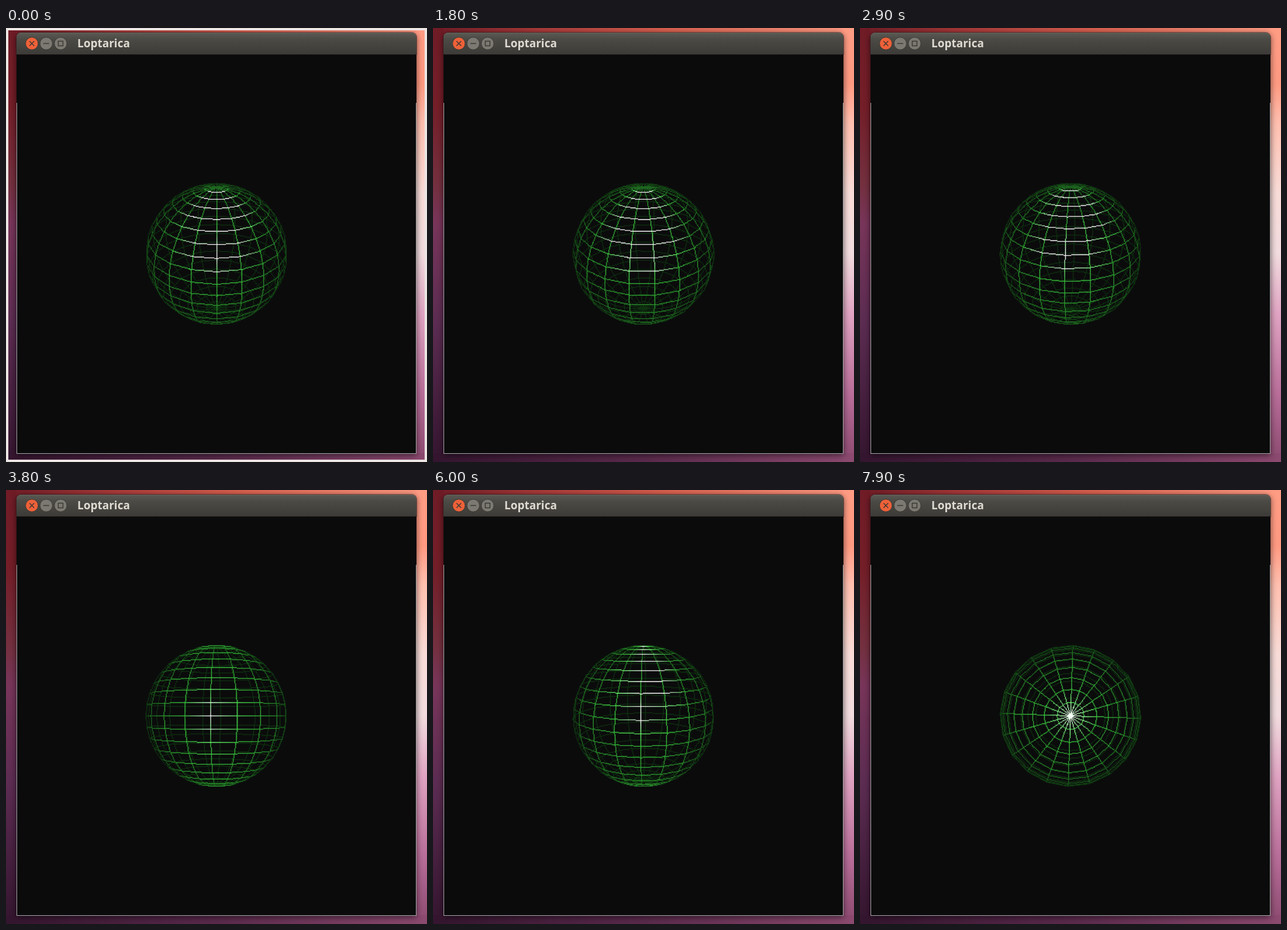
Recreate the animation shown at these times as an HTML page with a canvas. Size 720 by 742 pixels, loop 8 s.

```html
<!DOCTYPE html>
<html lang="en">
<head>
<meta charset="utf-8">
<title>Wire sphere</title>
<style>
html, body { margin: 0; width: 100%; height: 100%; overflow: hidden; }
#stage { position: relative; width: 720px; height: 742px; overflow: hidden;
  background: linear-gradient(90deg, #701c26, #a83a3a 25%, #d8604f 55%, #ff9c84); }
#stage > * { position: absolute; box-sizing: border-box; }
.side { top: 0; height: 742px; }
#left { left: 0; width: 18px;
  background: linear-gradient(#701c26, #741e28 18%, #74303f 36%, #78355a 45%, #5c2c52 68%, #34152f); }
#right { right: 0; width: 18px;
  background: linear-gradient(#ff9c84, #ff9a82 13%, #ffc0b0 22%, #f8dcd8 38%, #f2dcdf 52%, #e0a4c2 66%, #b96f9a 84%, #8c4a70); }
#bottom { left: 0; top: 727px; width: 720px; height: 15px;
  background: linear-gradient(90deg, #34152f, #5a2a4c 50%, #8c4a70); }
#window { left: 18px; top: 8px; width: 684px; height: 720px; border-radius: 8px 8px 0 0;
  background: #0b0b0c; box-shadow: 0 2px 11px rgba(0, 0, 0, .6); }
#sphere { left: 18.67px; top: 44px; width: 682.67px; height: 682.67px; }
#edge { left: 18px; top: 128px; width: 684px; height: 600px; border: 1px solid #a9a8a8; border-top: 0; }
#bar { left: 18px; top: 8px; width: 684px; height: 37px; border-radius: 8px 8px 0 0;
  background: linear-gradient(#5b5a54, #4b4a45 30%, #3c3b37);
  box-shadow: 0 0 0 1px rgba(45, 30, 28, .55), inset 0 1px #67655e; }
#bar svg { position: absolute; left: 0; top: 0; }
#bar span { position: absolute; left: 104px; top: 0; color: #dfdbd2;
  font: bold 19px/36px "Noto Sans", "Open Sans", sans-serif; }
#frame { inset: 0; border: 4px solid #ece5e3; }
</style>
</head>
<body>
<div id="stage">
  <div id="left" class="side"></div>
  <div id="right" class="side"></div>
  <div id="bottom"></div>
  <div id="window"></div>
  <canvas id="sphere" width="512" height="512"></canvas>
  <div id="edge"></div>
  <div id="bar">
    <svg width="100" height="37" fill="none" stroke="#3a3833">
      <circle cx="26.2" cy="18.5" r="10.7" fill="#ee6139"/>
      <circle cx="50.8" cy="18.5" r="10.7" fill="#7b7972"/>
      <circle cx="75.4" cy="18.5" r="10.7" fill="#7b7972"/>
      <path d="M22.2 14.5l8 8m0-8l-8 8M45.8 18.5h10M71.4 14.5h8v8h-8z" stroke-width="1.5"/>
    </svg>
    <span>Loptarica</span>
  </div>
  <div id="frame"></div>
</div>
<script>
const LOOP = 8000, SIZE = 512, PARTS = 20, DISTANCE = 5;
const FOCAL = SIZE / 2 * Math.sqrt(3);
const BACK = [11, 11, 12], GREEN = [60, 210, 64];
const ctx = document.getElementById('sphere').getContext('2d');
const frame = document.getElementById('frame');
const image = ctx.createImageData(SIZE, SIZE);
const rad = degrees => degrees * Math.PI / 180;

// Pictures change every 100 ms, and each fourth one stays for 200 ms.
function tickAt(ms) {
  const t = Math.max(0, ms - 300);
  return 4 * Math.floor(t / 500) + Math.min(3, Math.floor(t % 500 / 100));
}

// Degrees turned by a held key: one step, a short wait, then steady repeats.
function held(tick, press, limit) {
  if (tick < press) return 0;
  const turned = Math.max(2, 2 + 5.25 * (tick - press - 3));
  return Math.min(limit, 2 * Math.round(turned / 2));
}

function tilted([x, y, z], tilt) {
  const c = Math.cos(tilt), s = Math.sin(tilt);
  return [x, y * c - z * s, y * s + z * c];
}

// Projects and lights one vertex; the lamp sits at the eye.
function vertex(point, normal, tilt) {
  const [x, y, z] = tilted(point, tilt), n = tilted(normal, tilt);
  const depth = DISTANCE - z;
  const facing = (-n[0] * x - n[1] * y + n[2] * depth) / Math.hypot(x, y, depth);
  const light = Math.max(0, facing);
  const shine = Math.min(1, light ** 50);
  return {
    x: SIZE / 2 + FOCAL * x / depth,
    y: SIZE / 2 + 0.5 - FOCAL * y / depth,
    color: GREEN.map(g => Math.min(255, g * (0.24 + 0.76 * light) + 255 * shine))
  };
}

function line(a, b) {
  const dx = b.x - a.x, dy = b.y - a.y;
  const steps = Math.max(1, Math.ceil(Math.max(Math.abs(dx), Math.abs(dy))));
  for (let i = 0; i <= steps; i++) {
    const k = i / steps;
    const at = 4 * (Math.floor(a.y + dy * k) * SIZE + Math.floor(a.x + dx * k + 0.01));
    for (let c = 0; c < 3; c++) {
      const value = a.color[c] + (b.color[c] - a.color[c]) * k;
      image.data[at + c] = Math.max(image.data[at + c], value);
    }
  }
}

function strip(makeVertex) {
  let last = makeVertex(0);
  for (let i = 1; i <= PARTS; i++) {
    const next = makeVertex(i);
    line(last, next);
    last = next;
  }
}

function drawSphere(spin, tilt) {
  for (let i = 0; i < image.data.length; i += 4) image.data.set([...BACK, 255], i);
  const lon = i => spin + 2 * Math.PI * i / PARTS;
  const lat = j => Math.PI * (j / PARTS - 0.5);

  // Ring normals are longer than one towards the poles, which widens the highlight.
  for (let j = 1; j < PARTS; j++) {
    const r = Math.cos(lat(j)), h = Math.sin(lat(j));
    strip(i => {
      const s = Math.sin(lon(i)), c = Math.cos(lon(i));
      return vertex([r * s, h, r * c], [s, h, c], tilt);
    });
  }
  for (let i = 0; i < PARTS; i++) {
    const s = Math.sin(lon(i)), c = Math.cos(lon(i));
    strip(j => {
      const r = Math.cos(lat(j)), p = [r * s, Math.sin(lat(j)), r * c];
      return vertex(p, p, tilt);
    });
  }
  ctx.putImageData(image, 0, 0);
}

let shown = -1;
function render(now) {
  const tick = tickAt(now % LOOP);
  if (tick !== shown) {
    shown = tick;
    const spin = held(tick, 1, 86) - held(tick, 28.1, 52);
    const tilt = 30 - held(tick, 19.6, 30) + held(tick, 41, 90);
    drawSphere(rad(spin), rad(tilt));
    frame.style.opacity = Math.max(0, 1 - tick / 7);
  }
  requestAnimationFrame(time => render(Math.max(0, time - start)));
}
const start = performance.now();
render(0);
</script>
</body>
</html>
```
